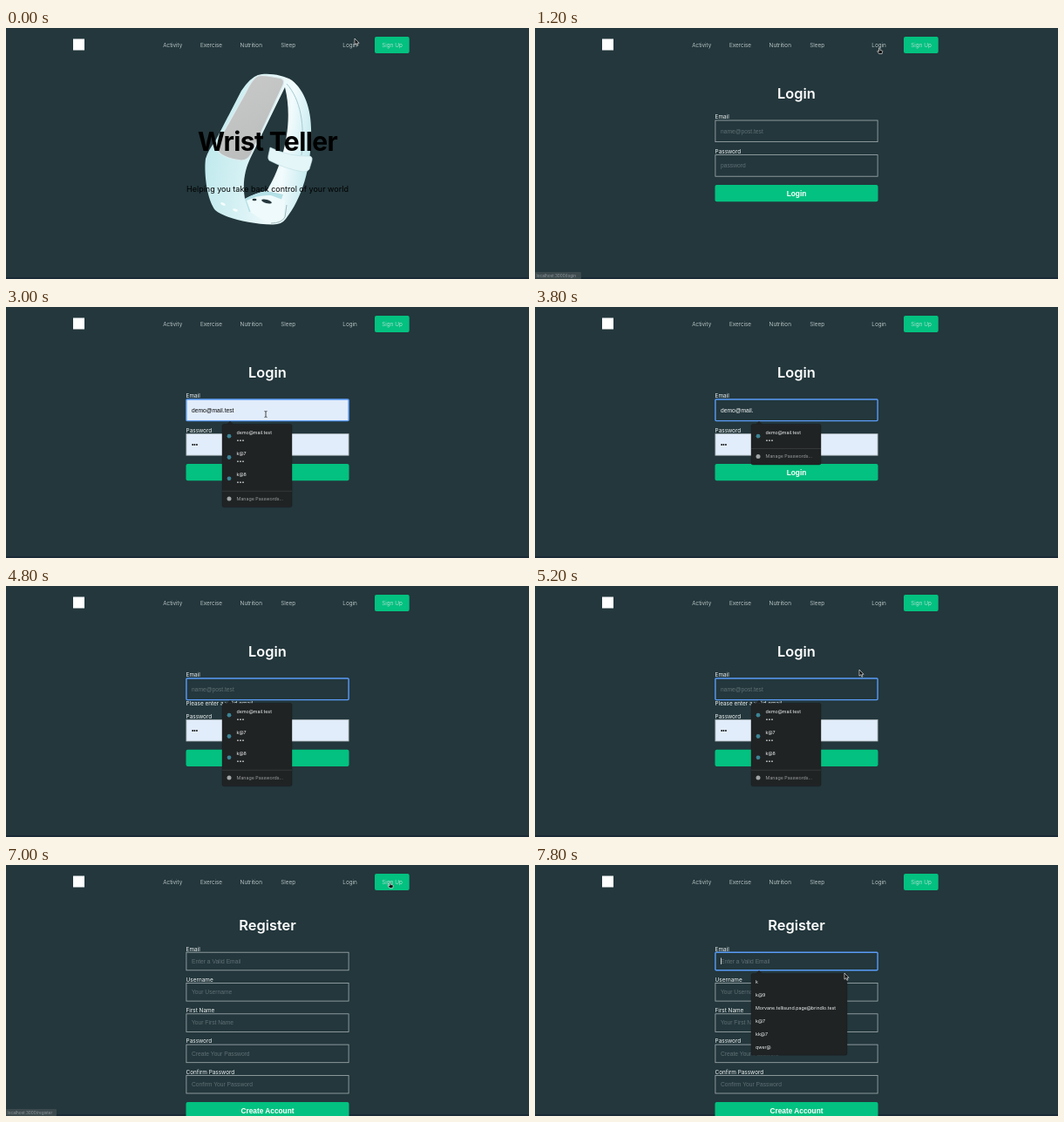
These frames come from a looping animation (600 by 288 pixels, 8000 ms). An HTML page:

```html
<!DOCTYPE html>
<html lang="en">
<head>
<meta charset="utf-8">
<title>Wrist Teller</title>
<style>
  html, body { margin: 0; width: 100%; height: 100%; overflow: hidden; background: #23373c; }
  svg { display: block; width: 100vw; height: 100vh; }
  text { font: 6.4px Inter, sans-serif; fill: #f1f4f4; white-space: pre; }
  .mid { text-anchor: middle; }
  .nav { fill: #dfe6e6; font-weight: 300; }
  .hero { font-size: 30px; font-weight: 700; letter-spacing: -.02em; fill: #000; }
  .sub { font-size: 9px; fill: #000; }
  .title { font-size: 16.4px; font-weight: 600; fill: #fff; }
  .input { font: 6.7px "Liberation Sans", Arial, sans-serif; }
  .hint { fill: #617074; }
  .dark { fill: #0a0a0a; }
  .btn { font: bold 8.3px "Liberation Sans", Arial, sans-serif; fill: #fff; }
  .menu { font-size: 5.3px; }
  .soft { fill: #9a9d9e; }
  .status { font-size: 4.7px; fill: #929c9f; }
</style>
</head>
<body>
<svg viewBox="0 0 600 288">
  <defs>
    <linearGradient id="band" x1="0" y1=".4" x2="1" y2=".6">
      <stop offset="0" stop-color="#bfe9ed"/>
      <stop offset=".35" stop-color="#d3f0f3"/>
      <stop offset=".75" stop-color="#f2fbfd"/>
      <stop offset="1" stop-color="#c2e9ee"/>
    </linearGradient>
    <linearGradient id="glass" x1="0" y1="0" x2=".4" y2="1">
      <stop offset="0" stop-color="#c9c9c9"/>
      <stop offset="1" stop-color="#bcbebe"/>
    </linearGradient>
    <g id="watch">
      <path fill="url(#band)" fill-rule="evenodd" d="M289 54C300 51 318 54 328 60C343 72 351 95 350 122C350 160 340 195 321 219Q316 226 305 225.500C280 225 250 218 240 209C230 196 227 165 229 150Q232 140 240 130L270 72Q280 57 289 54Z
        M320 68L281 148C274 162 271 178 274 196Q287 189 299 187C316 160 331 112 320 68Z"/>
      <path fill="#b4e0e6" d="M274 196Q287 189 299 187L318 191L313 205Q295 204 279 211Z"/>
      <path fill="#eefafb" d="M276 198Q290 191 304 192L320 198L318 221Q310 226 297 222L281 212Z"/>
      <path fill="none" stroke="#9fb9be" d="M304 224Q316 224 320 217L322 203"/>
      <path fill="url(#glass)" stroke="#dcecee" stroke-width="1.200" d="M288 55.500Q292 53.500 300 55L315 57.500Q320 59 318 65L281 145Q277 152 270 152C258 151 247 147 243 141Q240 137 243 131L275 74Q282 59 288 55.500Z"/>
      <path fill="#e4f6f8" stroke="#bedde2" stroke-width=".6" d="M303 137Q326 148 349 147Q352 148 351 152L348 162Q346 165 341 165Q321 162 302 152Q300 150 301 146Z"/>
      <path fill="none" stroke="#a4cbd1" d="M322 64C338 82 343 111 339 146"/>
      <g fill="#26383d">
        <ellipse cx="299" cy="199" rx="6" ry="2" transform="rotate(14 299 199)"/>
        <ellipse cx="285" cy="197" rx="2.500" ry="1.200"/>
      </g>
      <g fill="#f5fdfd">
        <ellipse cx="249" cy="202" rx="3" ry="1.500" transform="rotate(25 249 202)"/>
        <ellipse cx="263" cy="209" rx="3" ry="1.500" transform="rotate(18 263 209)"/>
      </g>
    </g>
    <path id="arrow" d="M0 0V7.200L1.700 5.700L2.900 8.300L4 7.800L2.900 5.300H5.100Z" fill="#111" stroke="#fff" stroke-width=".6"/>
    <path id="hand" d="M-1 -3Q-.2 -3.800 .4 -3V-.6L2.800 0Q3.400 .3 3.200 1.200L2.600 3.600H-.8L-2.800 .8Q-2.700 0 -1.900 .3L-1 1Z" fill="#111" stroke="#fff" stroke-width=".6"/>
    <path id="beam" d="M-1.500 -3.500Q0 -3.500 0 -2.500Q0 -3.500 1.500 -3.500M0 -2.500V2.500M-1.500 3.500Q0 3.500 0 2.500Q0 3.500 1.500 3.500" fill="none" stroke="#222" stroke-width=".8"/>
  </defs>
  <rect width="600" height="288" fill="#23373c"/>
  <rect y="286" width="600" height="2" fill="#1a2a35"/>
  <g id="nav"></g>
  <g id="page"></g>
  <use id="cursor"/>
</svg>
<script>
const LOOP = 8000, GREEN = '#03c180', EMAIL = 'demo@mail.test';
const $ = id => document.getElementById(id);

const text = (x, y, s, cls = '') => `<text x="${x}" y="${y}" class="${cls}">${s}</text>`;
const box = (x, y, w, h, attrs) => `<rect x="${x}" y="${y}" width="${w}" height="${h}" ${attrs}/>`;
const dot = (x, y, r, fill) => `<circle cx="${x}" cy="${y}" r="${r}" fill="${fill}"/>`;

function field(y, h, { value, hint, filled, focus }) {
  const edge = focus ? 'stroke="#5a9cf8" stroke-width="1.4" rx="1"' : 'stroke="#a5b0b2" stroke-width=".8"';
  const cls = value ? (filled ? 'dark' : '') : 'hint';
  return box(206.9, y, 186.2, h, `fill="${filled ? '#e2edfb' : '#23373c'}" ${edge}`)
    + text(213, y + h / 2 + 2.2, value || hint, 'input ' + cls);
}

const button = (y, label) =>
  box(206.5, y, 187, 19.3, `rx="2" fill="${GREEN}"`) + text(300, y + 12.6, label, 'btn mid');

const panel = (y, w, h) =>
  `<path d="M253 ${y}L257 ${y - 3.5}L261 ${y}Z" fill="#202324"/>`
  + box(248, y, w, h, 'rx="2" fill="#202324" stroke="#16191a" stroke-width=".4"');

function passwordMenu(names) {
  const step = 24.3, end = 138 + names.length * step;
  return panel(134.5, 80, end + 18.7 - 134.5)
    + names.map((n, i) => {
        const y = 145.8 + i * step;
        return dot(256, y + 2.4, 2.4, '#3c8496') + text(264.6, y, n, 'menu') + text(264.6, y + 9, '•••', 'menu');
      }).join('')
    + box(248, end, 80, .5, 'fill="#484c4d"')
    + dot(256, end + 9.2, 2.5, '#a2a5a6')
    + text(264.6, end + 11.1, 'Manage Passwords…', 'menu soft');
}

const home = () => '<use href="#watch"/>'
  + text(300, 140.5, 'Wrist Teller', 'hero mid')
  + text(300, 187.8, 'Helping you take back control of your world', 'sub mid');

function login(t) {
  const left = Math.max(0, Math.min(14, 14 - Math.floor((t - 3400) / 100)));
  const value = t < 1600 ? '' : EMAIL.slice(0, left);
  const bad = t >= 1600 && !value.includes('@');
  const shift = bad ? 7.8 : 0;
  const focus = t >= 2600 && t < 5600;
  const all = [EMAIL, 'k@7', 'k@8'];
  const names = left > 0 && left < 14 ? [EMAIL] : all;
  return text(300, 81, 'Login', 'title mid')
    + text(206.6, 104.2, 'Email')
    + field(106, 24.6, { value, hint: 'name@post.test', filled: value && left === 14, focus })
    + (bad ? text(206.6, 137.2, 'Please enter a valid email.') : '')
    + text(206.6, 143.8 + shift, 'Password')
    + field(145.6 + shift, 24.6, { value: t < 1600 ? '' : '•••', hint: 'password', filled: t >= 1600 })
    + button(180 + shift, 'Login')
    + (focus && t >= 2800 ? passwordMenu(names) : '');
}

function register(t) {
  const rows = [
    ['Email', 'Enter a Valid Email'],
    ['Username', 'Your Username'],
    ['First Name', 'Your First Name'],
    ['Password', 'Create Your Password'],
    ['Confirm Password', 'Confirm Your Password']
  ];
  const focus = t >= 7600;
  const past = ['k', 'k@9', 'Morvane.tellisund.page@brindlo.test', 'k@7', 'kk@7', 'qwer@'];
  return text(300, 75.2, 'Register', 'title mid')
    + rows.map(([label, hint], i) => {
        const y = 100.2 + i * 35.3;
        return text(206.6, y - 1.7, label) + field(y, 20.6, { hint, focus: focus && i === 0 });
      }).join('')
    + button(272, 'Create Account')
    + (focus ? box(213, 106.5, .7, 7.5, 'fill="#fff"') + panel(124.6, 110, 93.6)
        + past.map((s, i) => text(253, 135.7 + i * 15, s, 'menu')).join('') : '');
}

function status(t) {
  const path = t >= 600 && t < 1400 ? 'login' : t >= 6600 && t < 7400 ? 'register' : '';
  return path && box(0, 280, path === 'login' ? 53 : 58, 8, 'rx="1" fill="#3c494d"')
    + text(1.5, 286, 'localhost:3000/' + path, 'status');
}

// time, x, y, shape
const moves = [
  [0, 400, 12, 'arrow'], [200, 400, 13, 'arrow'], [400, 396, 25, 'hand'], [1200, 395.5, 26, 'hand'],
  [1400, 390, 32, 'arrow'], [2000, 298, 123, 'beam'], [3400, 298, 123, ''],
  [5000, 330, 121, 'beam'], [5200, 372, 96, 'arrow'], [5500, 398, 77, 'arrow'], [6100, 398, 77, 'arrow'],
  [6500, 441, 23, 'hand'], [7200, 441, 23, 'hand'], [7400, 400, 68, 'arrow'],
  [7600, 352, 113, 'beam'], [7800, 355, 124, 'arrow'], [8000, 355, 124, 'arrow']
];

function moveCursor(t) {
  const i = moves.findIndex((m, k) => k && t < m[0]) - 1;
  const [t0, x0, y0, shape] = moves[i], [t1, x1, y1] = moves[i + 1];
  const p = (t - t0) / (t1 - t0), e = p * p * (3 - 2 * p);
  const c = $('cursor');
  c.setAttribute('href', '#' + shape);
  c.setAttribute('visibility', shape ? 'visible' : 'hidden');
  c.setAttribute('transform', `translate(${x0 + (x1 - x0) * e} ${y0 + (y1 - y0) * e})`);
}

$('nav').innerHTML = box(77, 12.5, 13, 13, 'fill="#fff"')
  + [[180.3, 'Activity'], [223, 'Exercise'], [268.6, 'Nutrition'], [315.3, 'Sleep'], [386.3, 'Login']]
    .map(([x, s]) => text(x, 22, s, 'nav')).join('')
  + box(423, 10, 39.7, 19, `rx="2" fill="${GREEN}"`) + text(443, 22, 'Sign Up', 'nav mid');

let shown = '';
function draw(t) {
  const view = t < 800 ? home : t < 7000 ? login : register;
  const markup = view(t) + status(t);
  if (markup !== shown) $('page').innerHTML = shown = markup;
  moveCursor(t);
}

const start = performance.now();
function tick() {
  draw((performance.now() - start) % LOOP);
  requestAnimationFrame(tick);
}
tick();
</script>
</body>
</html>
```
